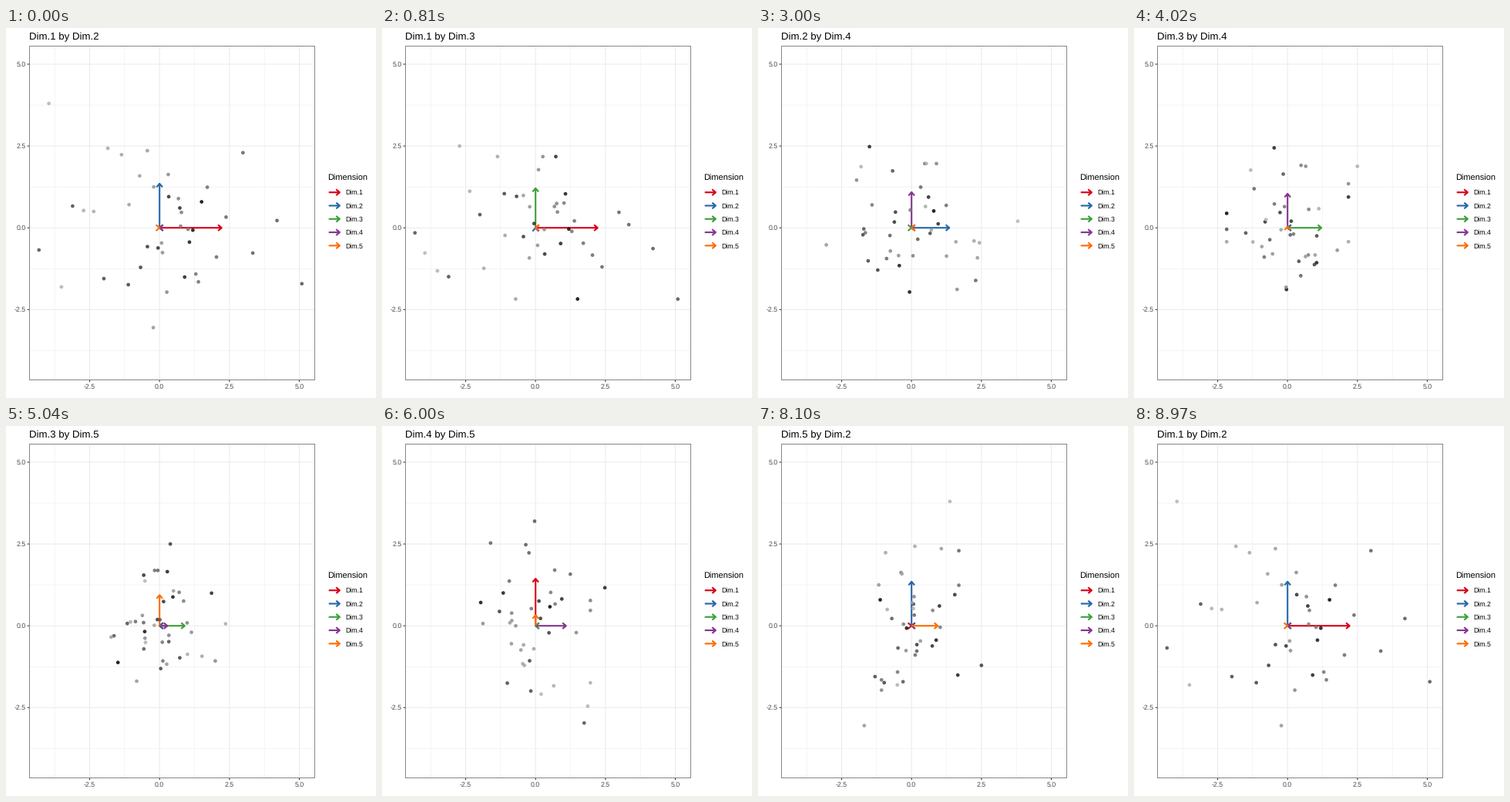
These frames come from a looping animation (480 by 480 pixels, 9 s). A matplotlib script:

```python
import numpy as np
import matplotlib.pyplot as plt
from matplotlib.animation import FuncAnimation

plt.rcParams.update({"font.family": "Liberation Sans",
                     "text.hinting": "none", "path.snap": False})

SIZE, DPI = 480, 72
FRAMES, INTERVAL = 300, 30
HOLD, MOVE = 10, 20
MOVE_X, MOVE_Y = 20, 18  # vertical turns settle slightly earlier
X0, Y0, UX, UY = 199.2, 259.2, 36.26, 42.45
LEFT, RIGHT, TOP, BOTTOM = 30.5, 400.5, 23.5, 456.5
COLORS = ["#db0019", "#2668aa", "#3e9f3b", "#85368f", "#ff6d00"]
LENGTHS = np.array([2.22, 1.35, 1.21, 1.09, 0.94])

# Pairs of dimensions on the x and y axes, visited in turn
STATES = [(0, 1), (0, 2), (1, 2), (1, 3), (2, 3),
          (2, 4), (3, 4), (3, 0), (4, 0), (4, 1)]

# Observations that stand out: row, dimension, score
EXTREMES = [(40, 1, 3.8), (31, 1, -3.05), (38, 2, 2.5), (3, 3, 2.48), (8, 4, 2.5)]


def make_scores():
    """Two groups, each ordered from high to low on the first dimension."""
    rng = np.random.default_rng(5)
    v, u = np.linspace(0, 1, 13), np.linspace(-1, 1, 28)
    first = np.concatenate([1.6 - 3 * v - 2.8 * v ** 5,
                            0.4 - 1.55 * u - 2.95 * u ** 3])
    first += rng.normal(0, 0.12, len(first))
    others = rng.normal(size=(len(first), 4))
    others = (others - others.mean(axis=0)) / others.std(axis=0)
    scores = np.column_stack([first, np.clip(others, -1.8, 1.8) * LENGTHS[1:]])
    for row, dim, value in EXTREMES:
        scores[row, dim] = value
    return scores


scores = make_scores()
fig = plt.figure(figsize=(SIZE / DPI, SIZE / DPI), dpi=DPI, facecolor="white")
ax = fig.add_axes([0, 0, 1, 1])
ax.set(xlim=(0, SIZE), ylim=(SIZE, 0))
ax.axis("off")


def to_px(x, y):
    return X0 + UX * x, Y0 - UY * y


def line(xs, ys, color, width, z=1):
    return ax.plot(xs, ys, color=color, lw=width, zorder=z, snap=False,
                   solid_capstyle="butt", solid_joinstyle="round")[0]


def label(x, y, text, size, color="black", ha="left"):
    return ax.text(x, y, text, fontsize=size, color=color, ha=ha, va="baseline")


def arrow_path(start, tip, direction, length=6, spread=np.radians(40)):
    """Shaft plus an open head, as one broken polyline."""
    arms = [(tip[0] - length * np.cos(direction + s),
             tip[1] - length * np.sin(direction + s)) for s in (spread, -spread)]
    gap = (np.nan, np.nan)
    return np.array([start, tip, gap, arms[0], tip, arms[1]]).T


def draw_panel():
    for value in np.arange(-3.75, 5.1, 1.25):
        major = value % 2.5 == 0
        px, py = to_px(value, value)
        width = 1.07 if major else 0.53
        line([px, px], [TOP, BOTTOM], "#ebebeb", width)
        line([LEFT, RIGHT], [py, py], "#ebebeb", width)
        # The vertical axis shows the same labels as the horizontal one
        if major:
            line([px, px], [BOTTOM, BOTTOM + 2.74], "#333333", 1.07)
            line([LEFT - 2.74, LEFT], [py, py], "#333333", 1.07)
            label(px, 467.6, f"{value:.1f}", 8.8, "#4d4d4d", "center")
            label(25.6, py + 3, f"{value:.1f}", 8.8, "#4d4d4d", "right")
    line([LEFT, RIGHT, RIGHT, LEFT, LEFT, RIGHT],
         [TOP, TOP, BOTTOM, BOTTOM, TOP, TOP], "#858585", 1, 6)


def draw_legend():
    label(417, 198, "Dimension", 11)
    for i, color in enumerate(COLORS):
        y = 213.2 + 17.28 * i
        line(*arrow_path((418.7, y), (432.9, y), 0), color, 2.13)
        label(440, y + 3.3, f"Dim.{i + 1}", 8.8)


draw_panel()
draw_legend()
title = label(30.5, 15.3, "", 13.2)
arrows = [line([], [], color, 2.13, 3) for color in COLORS]
shades = 0.7 * np.linspace(0, 1, len(scores)) ** 0.7
dots = ax.scatter(*to_px(scores[:, 0], scores[:, 1]), s=4.7 ** 2,
                  c=[str(s) for s in shades], alpha=0.85, linewidths=0, zorder=4)


def cubic_in_out(t):
    return 4 * t ** 3 if t < 0.5 else 1 - 4 * (1 - t) ** 3


def blend(start, end, moved, span):
    """Weights of the five dimensions on one axis."""
    mix = cubic_in_out(min(1, moved / span))
    unit = np.eye(5)
    return (1 - mix) * unit[start] + mix * unit[end]


def update(n):
    k, step = divmod(n, HOLD + MOVE)
    here, there = STATES[k], STATES[(k + 1) % len(STATES)]
    moved = max(0, step - HOLD)
    wx = blend(here[0], there[0], moved, MOVE_X)
    wy = blend(here[1], there[1], moved, MOVE_Y)
    dots.set_offsets(np.column_stack(to_px(scores @ wx, scores @ wy)))

    left_behind = set(STATES[k - 1]) - set(here)
    for i, arrow in enumerate(arrows):
        tip = to_px(LENGTHS[i] * wx[i], LENGTHS[i] * wy[i])
        if wx[i] or wy[i]:
            direction = np.arctan2(tip[1] - Y0, tip[0] - X0)
        else:
            direction = 0 if moved == 0 and i in left_behind else np.pi
        arrow.set_data(*arrow_path((X0, Y0), tip, direction))

    a, b = here if moved <= MOVE // 2 else there
    title.set_text(f"Dim.{a + 1} by Dim.{b + 1}")
    return [dots, title, *arrows]


anim = FuncAnimation(fig, update, frames=FRAMES, interval=INTERVAL,
                     repeat=True, repeat_delay=0, blit=False)
plt.show()
```
